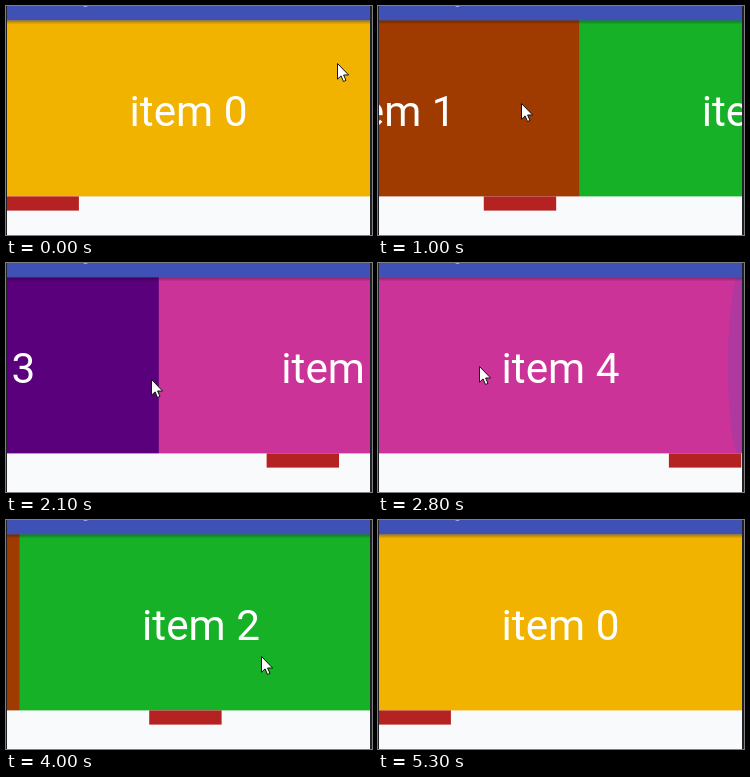
Animation, 366 px wide and 229 px high, one loop 5700 ms. Source, as an HTML page:

```html
<!DOCTYPE html>
<html lang="en">
<head>
<meta charset="utf-8">
<title>Pager with sliding indicator</title>
<style>
html, body { margin: 0; width: 100%; height: 100%; overflow: hidden; background: #f9fafc; }
#stage { display: block; }
text { font: 42.3px Roboto, sans-serif; fill: #fff; text-anchor: middle; }
.glow { fill: #3f51b5; opacity: 0; }
.edge { fill: #202126; }
</style>
</head>
<body>
<svg id="stage" width="366" height="229" viewBox="0 0 366 229">
  <defs>
    <linearGradient id="fade" x2="0" y2="1">
      <stop stop-opacity=".32"/>
      <stop offset="1" stop-opacity="0"/>
    </linearGradient>
  </defs>
  <g id="track"></g>
  <ellipse class="glow" id="glowLeft" cx="1" cy="102.4" rx="14" ry="96"/>
  <ellipse class="glow" id="glowRight" cx="364" cy="102.4" rx="14" ry="96"/>
  <rect y="190.4" width="366" height="40" fill="#f9fafc"/>
  <rect id="bar" x=".5" y="190.4" width="72.4" height="14.2" fill="#b52222"/>
  <rect y="14.4" width="366" height="4" fill="url(#fade)"/>
  <rect width="366" height="14.4" fill="#4051b5"/>
  <path d="M77 0h5q-2.5 2-5 0" fill="#a9b0dc"/>
  <rect class="edge" width="1" height="229"/>
  <rect class="edge" x="364" width="2" height="229"/>
  <path id="pointer" d="M.5 .5V16.2L4.1 12.9 6.5 18.5 9 17.4 6.6 12H11.6Z" fill="#fff" stroke="#111"/>
</svg>
<script>
const LOOP = 5700, STEP = 100, PAGE = 364, TAB = 72.6;
const SLIDE = 450, DRAG = 180, REACH = 150, GLOW = 500, LEAVE = 5300;
const COLORS = ['#f2b200', '#9f3b00', '#17b128', '#5b007c', '#cc3399'];
const LAST = COLORS.length - 1;

// Swipes: start time, page direction, grab point
const SWIPES = [
  [260, 1, 280, 90], [790, 1, 280, 96], [1318, 1, 280, 112], [1850, 1, 280, 119],
  [2550, 1, 245, 100],
  [3000, -1, 120, 110], [3480, -1, 130, 130], [3950, -1, 213, 136], [4237, -1, 160, 138],
  [4760, -1, 100, 140]
];

// Pointer drags against the page direction, then travels to the next grab
const TRAIL = [[0, 331, 57], ...SWIPES.flatMap(([t, dir, x, y]) =>
  [[t, x, y], [t + DRAG, x - dir * REACH, y]])];

const $ = id => document.getElementById(id);
const clamp = (v, lo, hi) => Math.min(hi, Math.max(lo, v));
const smooth = u => u * u * (3 - 2 * u);

// Scroll position, and the edge glow when a swipe runs past either end
function scroll(t) {
  let pos = 0, left = 0, right = 0;
  for (const [start, dir] of SWIPES) {
    if (t <= start) break;
    const next = pos + dir * smooth(Math.min(1, (t - start) / SLIDE));
    const glow = .2 * Math.sin(Math.PI * Math.min(1, (t - start) / GLOW));
    if (next < 0) left = glow;
    if (next > LAST) right = glow;
    pos = clamp(next, 0, LAST);
  }
  return { pos, left, right };
}

function pointer(t) {
  const i = TRAIL.findIndex(p => p[0] > t);
  if (i < 0) return TRAIL[TRAIL.length - 1].slice(1);
  const a = TRAIL[i - 1], b = TRAIL[i];
  const u = (t - a[0]) / (b[0] - a[0]);
  return [1, 2].map(k => Math.round(a[k] + (b[k] - a[k]) * u));
}

// Each page runs on beneath the next, so no seam shows between them
$('track').innerHTML = COLORS.map((color, i) => `
  <g transform="translate(${i * PAGE})">
    <rect y="14" width="${2 * PAGE}" height="177" fill="${color}"/>
    <text x="181.5" y="120">item ${i}</text>
  </g>`).join('');

function render(time) {
  const t = Math.floor(time % LOOP / STEP) * STEP;
  const { pos, left, right } = scroll(t);
  $('track').setAttribute('transform', `translate(${1 - pos * PAGE})`);
  $('bar').setAttribute('transform', `translate(${pos * TAB})`);
  $('glowLeft').style.opacity = left;
  $('glowRight').style.opacity = right;
  $('pointer').setAttribute('transform', `translate(${pointer(t)})`);
  $('pointer').style.visibility = t < LEAVE ? 'visible' : 'hidden';
}

const start = performance.now();
function tick() {
  render(performance.now() - start);
  requestAnimationFrame(tick);
}
tick();
</script>
</body>
</html>
```
